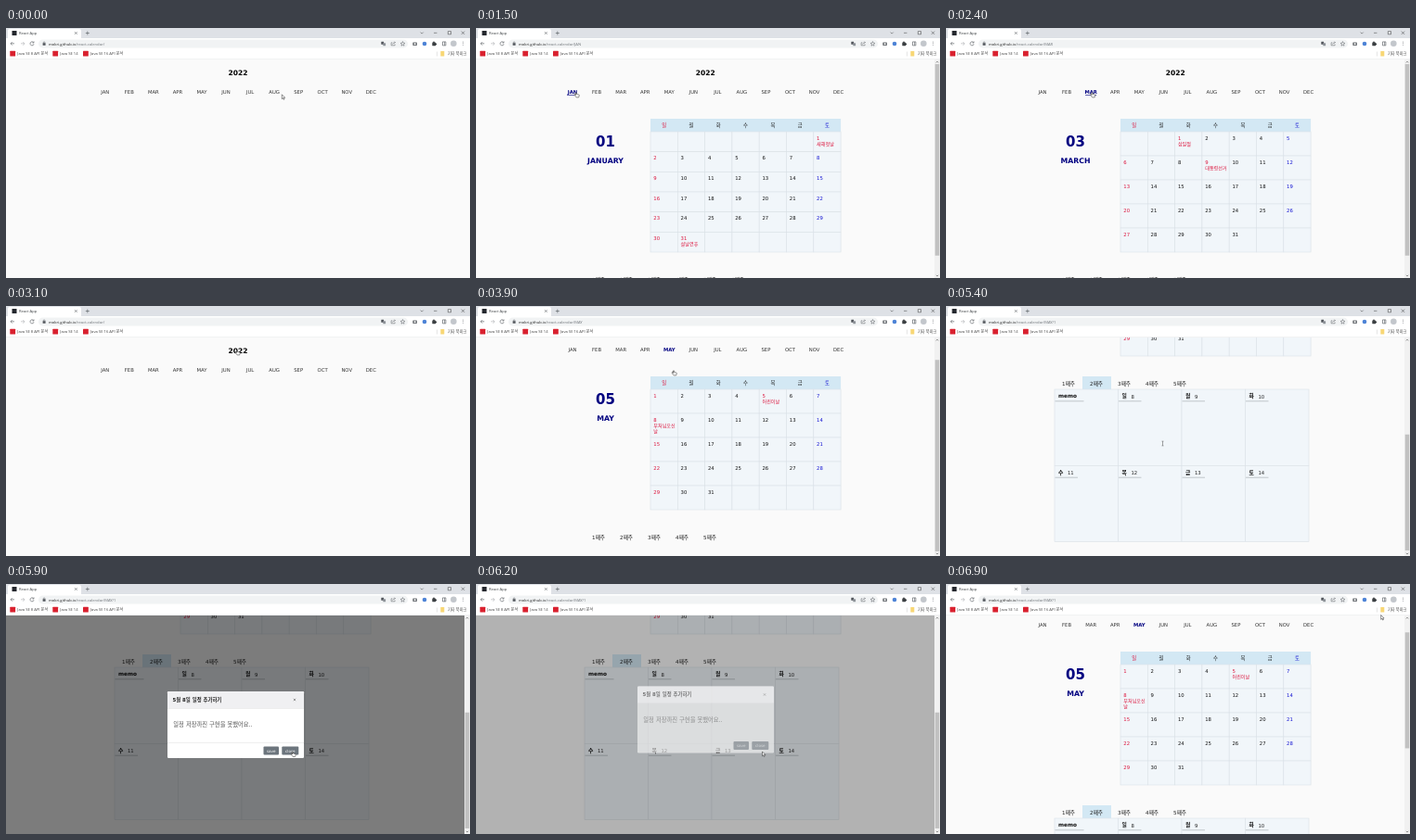
Write an HTML page with a canvas that moves like this. It is 500 px wide and 270 px high and loops after 7 s.

```html
<!DOCTYPE html>
<html>
<head>
<meta charset="utf-8">
<title>Calendar</title>
<style>
html, body { margin: 0; height: 100%; overflow: hidden; background: #fafafa }
canvas { display: block; width: 500px; height: 270px }
</style>
</head>
<body>
<canvas id="stage"></canvas>
<script>
const stage = document.getElementById('stage'), g = stage.getContext('2d');
const dpr = window.devicePixelRatio || 1;
stage.width = 500 * dpr;
stage.height = 270 * dpr;

const LOOP = 7000, TOP = 34;
const PAGE_FONT = '"DejaVu Sans", "Noto Sans CJK KR", sans-serif';
const UI_FONT = '"Open Sans", "Noto Sans CJK KR", sans-serif';
const MONTHS = ['JANUARY', 'FEBRUARY', 'MARCH', 'APRIL', 'MAY', 'JUNE', 'JULY',
  'AUGUST', 'SEPTEMBER', 'OCTOBER', 'NOVEMBER', 'DECEMBER'];
const DAYS = [...'일월화수목금토'];
const HOLIDAYS = {
  '1/1': '새해첫날', '1/31': '설날연휴', '2/1': '설날', '2/2': '설날연휴',
  '3/1': '삼일절', '3/9': '대통령선거', '5/5': '어린이날', '5/8': '부처님오신날'
};
const RED = '#dc143c', BLUE = '#1414d2', NAVY = '#000080', HEAD = '#d3e8f4', CELL = '#f1f6fa', LINE = '#dae1e7';

// [time, x, y, shape from this time on]
const POINTER = [
  [0, 297.3, 71.8, 'arrow'], [400, 297.3, 71.8], [600, 311, 82], [800, 297, 72], [1000, 297, 72],
  [1300, 92, 76], [1400, 107.5, 69.5, 'hand'], [1700, 107.5, 69.5], [1900, 131, 69.5], [2200, 131, 69.5],
  [2350, 157, 69.5], [2600, 157, 69.5, 'arrow'], [3000, 248.5, 47.5, 'hand'], [3300, 248.5, 47.5],
  [3500, 212.5, 69.5], [4050, 212.5, 69.5, 'arrow'], [4350, 132, 251, 'hand'], [4900, 132, 251, 'arrow'],
  [5050, 162, 85, 'hand'], [5200, 162, 85, 'text'], [5350, 233.5, 148.5], [5600, 233.5, 148.5, 'arrow'],
  [5850, 308.5, 181, 'hand'], [6200, 308.5, 181, 'arrow'], [6800, 468.7, 33.5]
];
const SCROLL = [[0, 0], [3600, 0], [3800, 22], [4500, 22], [4800, 188], [6300, 188], [6750, 25]];
const MONTH_AT = [[0, -1], [1400, 0], [2000, 1], [2400, 2], [3000, -1], [3500, 4]];
const WEEK_AT = [[0, -1], [4400, 0], [5150, 1]];
const FADE = [[0, 0], [5500, 0], [5620, 1], [6120, 1], [6300, 0]];

const SHAPES = {
  arrow: new Path2D('M0 0V4.8L1.1 3.8 1.9 5.5 2.7 5.1 1.9 3.5H3.4Z'),
  hand: new Path2D('M0 .4Q.5-.3 1 .4V2L3.4 2.5Q3.9 2.8 3.7 3.6L3.2 5.4H.6L-1.2 3.2Q-1-.1 0 3Z')
};

const lastKey = (keys, t) => keys.filter(k => k[0] <= t).pop();
function tween(keys, t, col = 1) {
  const a = lastKey(keys, t), b = keys[keys.indexOf(a) + 1];
  if (!b) return a[col];
  const p = (t - a[0]) / (b[0] - a[0]);
  return a[col] + (b[col] - a[col]) * p * p * (3 - 2 * p);
}

function rect(x, y, w, h, fill, r = 0) {
  g.fillStyle = fill;
  g.beginPath();
  g.roundRect(x, y, w, h, r);
  g.fill();
}
function box(x, y, w, h) {
  rect(x, y, w, h, CELL);
  g.strokeStyle = LINE;
  g.lineWidth = .6;
  g.strokeRect(x, y, w, h);
}
function path(d, color, width = .6) {
  g.strokeStyle = color;
  g.lineWidth = width;
  g.stroke(new Path2D(d));
}
function dot(x, y, r, color) {
  rect(x - r, y - r, 2 * r, 2 * r, color, r);
}
// y is the middle of the capitals
function text(s, x, y, size, color = '#222', { align = 'left', bold = false, font = PAGE_FONT } = {}) {
  g.font = `${bold ? 'bold ' : ''}${size}px ${font}`;
  g.textAlign = align;
  g.fillStyle = color;
  g.fillText(s, x, y + size * .365);
  return g.measureText(s).width;
}
const ui = (s, x, y, size, color) => text(s, x, y, size, color, { font: UI_FONT });
const mid = (s, x, y, size, color, bold) => text(s, x, y, size, color, { align: 'center', bold });

function drawNav(center, month, mouse) {
  mid('2022', center, 48.2, 7.5, '#000', true);
  MONTHS.forEach((name, i) => {
    const x = center + (i - 5.5) * 26.05, on = i === month;
    mid(name.slice(0, 3), x, 69, 5.3, on ? NAVY : '#333', on);
    if (on && mouse.shape === 'hand' && Math.abs(mouse.x - x) < 7 && Math.abs(mouse.y - 70) < 4)
      rect(x - 6, 72, 12, .6, NAVY);
  });
}

function drawMonth(month, first, days, rows) {
  const left = 188, top = 98, colW = 29.3, rowH = 130 / rows;
  mid(String(month + 1).padStart(2, '0'), 139.5, 123, 15, NAVY, true);
  mid(MONTHS[month], 139.5, 143, 7.8, NAVY, true);
  rect(left, top, colW * 7, 14, HEAD);
  DAYS.forEach((d, i) =>
    mid(d, left + colW * (i + .5), top + 6.8, 5.3, i === 0 ? RED : i === 6 ? BLUE : '#222'));
  for (let i = 0; i < rows * 7; i++) {
    const x = left + i % 7 * colW, y = top + 14 + Math.floor(i / 7) * rowH, day = i - first + 1;
    box(x, y, colW, rowH);
    if (day < 1 || day > days) continue;
    const holiday = HOLIDAYS[`${month + 1}/${day}`];
    const color = holiday || i % 7 === 0 ? RED : i % 7 === 6 ? BLUE : '#111';
    text(day, x + 3.3, y + 6.7, 5.3, color);
    (holiday?.match(/.{1,5}/g) || []).forEach((part, n) => text(part, x + 3.3, y + 12.7 + n * 6.2, 5.1, RED));
  }
}

function drawWeeks(week, first, days, rows) {
  for (let i = 0; i < rows; i++) {
    if (i === week) rect(117 + 30 * i, 264, 31, 14, HEAD);
    mid(i + 1 + '째주', 132 + 30 * i, 272, 5.6);
  }
  if (week < 0) return;
  ['memo', ...DAYS].forEach((label, i) => {
    const x = 117 + i % 4 * 68.5, y = 278 + (i >> 2) * 82.3, day = week * 7 + i - first;
    box(x, y, 68.5, 82.3);
    text(label, x + 4, y + 7.3, 5.8, '#111', { bold: true });
    if (i && day > 0 && day <= days) text(day, x + 14, y + 7.8, 5.3);
    rect(x + .5, y + 12.5, i ? 24.5 : 31, .7, '#aab0b5');
  });
}

function drawScrollbar(scroll, height) {
  const track = 226, view = 270 - TOP;
  rect(494, TOP, 6, view, '#f1f1f1');
  rect(494.7, 39 + scroll / height * track, 4.6, view / height * track, '#c1c1c1');
  path('M495.8 37.4l1.2-1.3 1.2 1.3M495.8 266.8l1.2 1.3 1.2-1.3', '#666', .7);
}

function drawDialog(alpha) {
  if (!alpha) return;
  g.save();
  g.globalAlpha = alpha;
  rect(0, TOP, 494, 270 - TOP, 'rgba(0,0,0,.5)');
  g.translate(0, (alpha - 1) * 13);
  rect(174, 116, 147, 72, '#fff', 1.3);
  rect(174, 116, 147, 18, '#f0f0f2', [1.3, 1.3, 0, 0]);
  rect(174, 134, 147, .4, '#ddd');
  rect(174, 171, 147, .4, '#ddd');
  text('5월 8일 일정 추가하기', 179.5, 125, 5.4, '#222', { bold: true });
  path('M309.8 123.8l2.4 2.4m0-2.4l-2.4 2.4', '#777', .7);
  text('일정 저장까진 구현을 못했어요..', 180.3, 152, 6.3, '#555');
  [['save', 277.5, 16.5], ['close', 297.3, 18]].forEach(([label, x, w]) => {
    rect(x, 175.5, w, 9, '#6c757d', 1);
    mid(label, x + w / 2, 180.2, 4.1, '#fff');
  });
  g.restore();
}

function drawBrowser(route) {
  const dark = '#50545a';
  rect(0, 0, 500, 12, '#dee1e6');
  rect(2, 1, 79, 11, '#fff', [2, 2, 0, 0]);
  rect(0, 11, 500, TOP - 11, '#fff');
  rect(0, TOP - .5, 500, .5, '#e3e5e8');
  rect(6.5, 3, 5, 5, '#24272d');
  ui('React App', 14, 5.6, 4.1, '#3c4043');
  path('M74 4.2l2.6 2.6m0-2.6L74 6.8M85.8 5.5h4M87.8 3.5v4', dark);
  path('M446.7 4.6l1.5 1.5 1.5-1.5M461 5.3h3.4M476.3 3.6h3.2v3.2h-3.2ZM490.8 3.6l3.3 3.3m0-3.3l-3.3 3.3', '#333', .5);

  path('M9 16.8H5m1.8-1.8L5 16.8l1.8 1.8', dark);
  path('M16 16.8h4m-1.8-1.8l1.8 1.8-1.8 1.8', '#aaadb1');
  path('M29.6 15.6A2 2 0 1 0 30 17.2M30 14.4v1.6h-1.6', dark);
  rect(35, 12.6, 398, 8.8, '#f1f3f4', 4.4);
  rect(39.6, 16.3, 3, 2.4, dark, .3);
  path('M40.3 16.4v-.8a.8 .8 0 0 1 1.6 0v.8', dark, .5);
  const host = ui('mokri.github.io', 46, 17, 4.15, '#222');
  ui('/react-calendar/' + route, 46 + host, 17, 4.15, '#70757a');

  rect(404.3, 14.8, 2.8, 3, dark, .3);
  rect(406.3, 16.2, 2.8, 3, '#8d9298', .3);
  path('M416.3 15.8h-1.2v3h4v-1.3M416.6 17.6q.3-2 2.8-2m-1-1l1 1-1 1', dark, .5);
  path('M427.5 14.6l.7 1.6 1.7.2-1.3 1.1.4 1.7-1.5-.9-1.5.9.4-1.7-1.3-1.1 1.7-.2Z', dark, .5);
  rect(438.3, 15.4, 4.6, 3.5, '#676b70', .6);
  dot(440.6, 17.2, 1, '#fff');
  dot(451, 17, 2.3, '#4d83d6');
  rect(459.3, 15.6, 3.8, 3.6, '#3c4043', .4);
  dot(461, 15.3, .9, '#3c4043');
  dot(463.3, 17.4, .9, '#3c4043');
  path('M470.5 14.9h3.4v4h-3.4ZM472.6 15v3.8', dark, .6);
  dot(482.3, 16.8, 3.3, '#c3c7cc');
  [15, 16.8, 18.6].forEach(y => dot(492.7, y, .45, dark));

  [[4.3, 'Java SE 8 API 문서'], [50.3, 'Java SE 14'], [83, 'Java SE 16 API 문서']].forEach(([x, label]) => {
    rect(x, 24.8, 5.8, 5.8, '#d9202e', .5);
    ui(label, x + 8, 27.8, 4.15, '#444');
  });
  rect(464, 25.5, .5, 5, '#ccc');
  rect(468.3, 25, 4, 5.6, '#f8d775', .4);
  ui('기타 북마크', 476, 27.8, 4.2, '#444');
}

function drawPointer({ x, y, shape }) {
  g.save();
  g.translate(x, y);
  if (shape === 'text') {
    path('M-1-2.4H1M0-2.4V2.4M-1 2.4H1', '#666', .6);
  } else {
    g.fillStyle = '#fff';
    g.fill(SHAPES[shape]);
    g.strokeStyle = '#222';
    g.lineWidth = .5;
    g.stroke(SHAPES[shape]);
  }
  g.restore();
}

function draw(t) {
  const month = lastKey(MONTH_AT, t)[1], week = lastKey(WEEK_AT, t)[1], scroll = tween(SCROLL, t);
  const mouse = {
    x: tween(POINTER, t, 1),
    y: tween(POINTER, t, 2),
    shape: lastKey(POINTER.filter(k => k[3]), t)[3]
  };
  g.setTransform(dpr, 0, 0, dpr, 0, 0);
  rect(0, 0, 500, 270, '#fafafa');
  g.save();
  g.translate(0, -scroll);
  drawNav(month < 0 ? 250 : 247.3, month, { ...mouse, y: mouse.y + scroll });
  if (month >= 0) {
    const first = new Date(2022, month, 1).getDay(), days = new Date(2022, month + 1, 0).getDate();
    const rows = Math.ceil((first + days) / 7);
    drawMonth(month, first, days, rows);
    drawWeeks(week, first, days, rows);
  }
  g.restore();
  if (month >= 0) drawScrollbar(scroll, week < 0 ? 258 : 426);
  drawDialog(tween(FADE, t));
  drawBrowser(month < 0 ? '' : MONTHS[month].slice(0, 3) + (week < 0 ? '' : '/' + week));
  drawPointer(mouse);
}

function frame() {
  draw(performance.now() % LOOP);
  requestAnimationFrame(frame);
}
frame();
</script>
</body>
</html>
```
